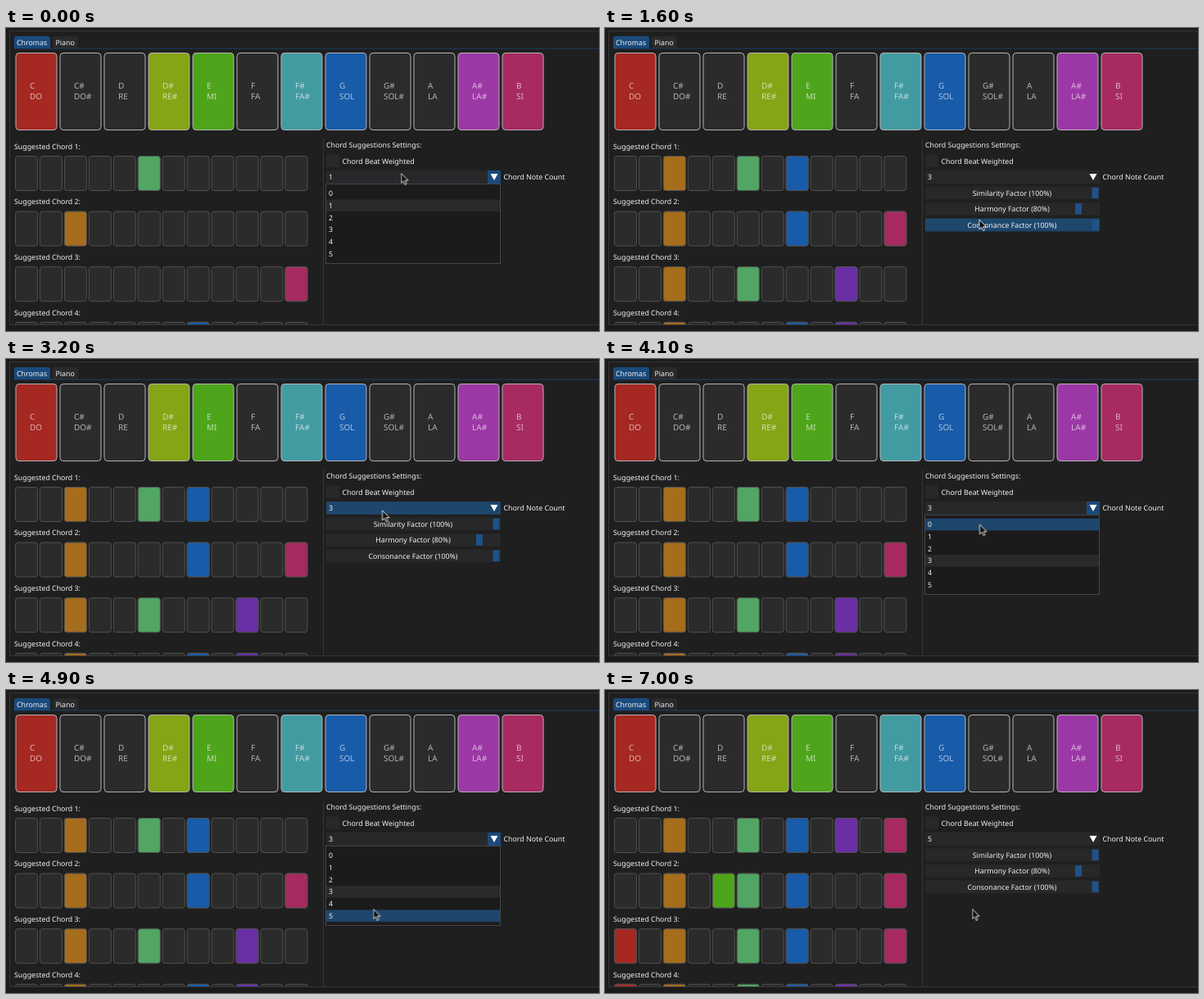
Write an HTML page that moves like this. It is 724 px wide and 370 px high and loops after 8100 ms.

```html
<!DOCTYPE html>
<html lang="en">
<head>
<meta charset="utf-8">
<title>Chord suggestions</title>
<style>
  html, body { margin: 0; width: 100%; height: 100%; overflow: hidden; background: #1b1b1b; }
  svg { display: block; width: 724px; height: 370px; }
  text { font: 500 8.8px "Noto Sans", "Open Sans", sans-serif; fill: #f2f2f2; text-rendering: geometricPrecision; }
  .key text { font-size: 10px; fill: #fff; fill-opacity: .64; }
  .key rect { stroke: #b4b4b4; }
  .cell { stroke: #505050; }
  .frame { fill: #27282a; }
  .grab { fill: #1f5288; }
  .hover { fill: #1e476e; }
  .line { fill: none; stroke: #363636; }
</style>
</head>
<body>
<svg id="stage" viewBox="0 0 724 370"></svg>
<script>
const LOOP = 8100;
const NEUTRAL = '#2b2b2b';
const RED = '#a52822', GREEN = '#4ea51b', BLUE = '#185ba9', PINK = '#a72a60';

const range = (n, draw) => Array.from({ length: n }, (_, i) => draw(i)).join('');
const rect = (x, y, w, h, attrs = '') => `<rect x="${x}" y="${y}" width="${w}" height="${h}" ${attrs}/>`;
// y is the vertical middle of the capitals
const text = (x, y, label, attrs = '') => `<text x="${x}" y="${y + 3.2}" ${attrs}>${label}</text>`;
const group = (id, content) => `<g id="${id}">${content}</g>`;

const notes = ['C DO', 'C# DO#', 'D RE', 'D# RE#', 'E MI', 'F FA', 'F# FA#', 'G SOL', 'G# SOL#', 'A LA', 'A# LA#', 'B SI'];
const keyColors = { 0: RED, 3: '#85a416', 4: GREEN, 6: '#439ba2', 7: BLUE, 10: '#9c38a5', 11: PINK };
const cellColors = { 0: RED, 2: '#a66d1d', 4: GREEN, 5: '#50a662', 7: BLUE, 9: '#6a2ea5', 11: PINK };
const chords = {
  1: [[5], [2], [11], [7]],
  3: [[2, 5, 7], [2, 7, 11], [2, 5, 9], [2, 7, 9]],
  5: [[2, 5, 7, 9, 11], [2, 4, 5, 7, 11], [0, 2, 5, 7, 11], [0, 2, 5, 7, 9]]
};

const key = i => {
  const [name, solfege] = notes[i].split(' ');
  const x = 12 + 54 * i;
  return `<g class="key">${rect(x, 30.5, 50, 94, `rx="4" fill="${keyColors[i] || NEUTRAL}"`)}
    ${text(x + 17, 71, name)}${text(x + 17, 84, solfege)}</g>`;
};

const cell = (row, i, fill) =>
  rect(11.5 + 29.95 * i, 156.5 + 67.6 * row, 27, 42, `rx="3" class="cell" fill="${fill}"`);
const emptyRow = row =>
  text(10, 144.3 + 67.7 * row, `Suggested Chord ${row + 1}:`) + range(12, i => cell(row, i, NEUTRAL));
const chordSet = count => group('chords' + count,
  chords[count].map((tones, row) => tones.map(i => cell(row, i, cellColors[i])).join('')).join(''));

const rowY = i => 194.8 + 14.75 * i;
const sliderY = i => 193.7 + 19.45 * i;
const slider = (i, label, grabX) =>
  rect(grabX, sliderY(i) + 1, 8, 13.5, 'class="grab"') +
  text(497, sliderY(i) + 7.8, label, 'text-anchor="middle"');
const selectedRow = i => rect(391, rowY(i), 212, 14.5, 'fill="#2a2a2d"');

document.getElementById('stage').innerHTML = `
  <clipPath id="panel">${rect(4, 3, 720, 359)}</clipPath>
  ${rect(4.5, 3.5, 730, 359, 'fill="#1f1f1f" class="panel"')}
  <path class="line" d="M724 3.5H4.5V362.5H724M387.5 135V362"/>
  <path d="M10 25V13q0-3 3-3H51q3 0 3 3V25Z" fill="#1a4a7c"/>
  <path d="M57 25V13q0-3 3-3H85q3 0 3 3V25Z" fill="#292a2b"/>
  ${rect(10, 24.5, 714, 1, 'fill="#1a416a"')}
  ${text(13, 18, 'Chromas')}${text(60.5, 18, 'Piano')}
  ${range(12, key)}
  <g clip-path="url(#panel)">${range(4, emptyRow)}${[1, 3, 5].map(chordSet).join('')}</g>

  ${text(391, 143, 'Chord Suggestions Settings:')}
  ${rect(391, 154.5, 16, 15.5, 'class="frame"')}${text(410.5, 162.3, 'Chord Beat Weighted')}
  ${rect(391, 174, 213, 16, 'class="frame"')}
  ${range(3, i => rect(391, sliderY(i), 213, 15.5, 'class="frame"'))}
  ${rect(391, 0, 213, 15.7, 'class="hover" id="barHover"')}
  ${slider(0, 'Similarity Factor (100%)', 594.5)}
  ${slider(1, 'Harmony Factor (80%)', 574)}
  ${slider(2, 'Consonance Factor (100%)', 594.5)}
  ${text(607.5, 182, 'Chord Note Count')}
  ${[1, 3, 5].map(n => group('value' + n, text(394, 182, n))).join('')}

  ${group('popup', `
    ${rect(588, 174, 16, 16, 'fill="#1c4a7b"')}
    ${rect(390.5, 190.5, 213, 97, 'fill="#1b1b1b" stroke="#454545"')}
    ${group('selected1', selectedRow(1))}${group('selected3', selectedRow(3))}
    ${rect(391, 0, 212, 14.5, 'class="hover" id="rowHover"')}
    ${range(6, i => text(394, 202 + 14.75 * i, i))}`)}
  <path d="M591.5 178H600.5L596 186Z" fill="#fff"/>
  <path id="cursor" d="M0 0V12L2.8 9.4L4.7 13.5L6.6 12.6L4.8 8.7H8.6Z"
    fill="#111" stroke="#f4f4f4" stroke-width=".9" stroke-linejoin="round"/>`;

// Each stop is [milliseconds, value, easing]; without easing the value holds.
const sheet = document.head.appendChild(document.createElement('style'));
const animate = (id, property, stops) => {
  const frames = [...stops, [LOOP + 1, stops[stops.length - 1][1]]].map(([ms, value, ease = 'step-end']) =>
    `${(Math.max(0, ms - 1) / LOOP * 100).toFixed(4)}% { ${property}: ${value}; animation-timing-function: ${ease}; }`);
  sheet.textContent += `@keyframes ${id} { ${frames.join(' ')} }
    #${id} { animation: ${id} ${LOOP}ms infinite; }\n`;
};
const show = (id, ...toggles) =>
  animate(id, 'opacity', [[0, 0], ...toggles.map((ms, i) => [ms, (i + 1) % 2])].filter(([ms], i) => i || toggles[0] !== ms));
const at = (x, y) => `translate(${x}px, ${y}px)`;
const steps = n => `steps(${n}, start)`;
const hidden = -40;
const slide = (id, stops) => animate(id, 'transform', stops.map(([ms, y]) => [ms, at(0, y)]));

for (const name of ['chords', 'value']) {
  show(name + 1, 0, 1200);
  show(name + 3, 1200, 5400);
  show(name + 5, 5400);
}
show('popup', 0, 1200, 3800, 5400);
show('selected1', 0, 1200);
show('selected3', 1200);

slide('barHover', [[0, hidden], [1200, sliderY(2)], [1700, sliderY(1)], [1900, sliderY(0)], [2200, 174.1], [3800, hidden]]);
slide('rowHover', [
  [0, hidden], [300, rowY(0)], [500, rowY(1)], [600, rowY(2)], [800, rowY(3)], [1200, hidden],
  [4100, rowY(0)], [4200, rowY(1)], [4300, rowY(2)], [4400, rowY(3)], [4500, rowY(4)], [4700, rowY(5)], [5400, hidden]
]);
animate('cursor', 'transform', [
  [0, at(482.5, 177.5)], [200, at(482.5, 177.5), steps(7)], [900, at(456.5, 242)],
  [1600, at(456.5, 242), steps(5)], [2100, at(458.5, 202), steps(3)], [2400, at(459.5, 185)],
  [4100, at(459.5, 185), steps(4)], [4500, at(451.5, 253.5), steps(3)], [4800, at(448.5, 268.5)],
  [4900, at(448.5, 267.5)]
]);
</script>
</body>
</html>
```
